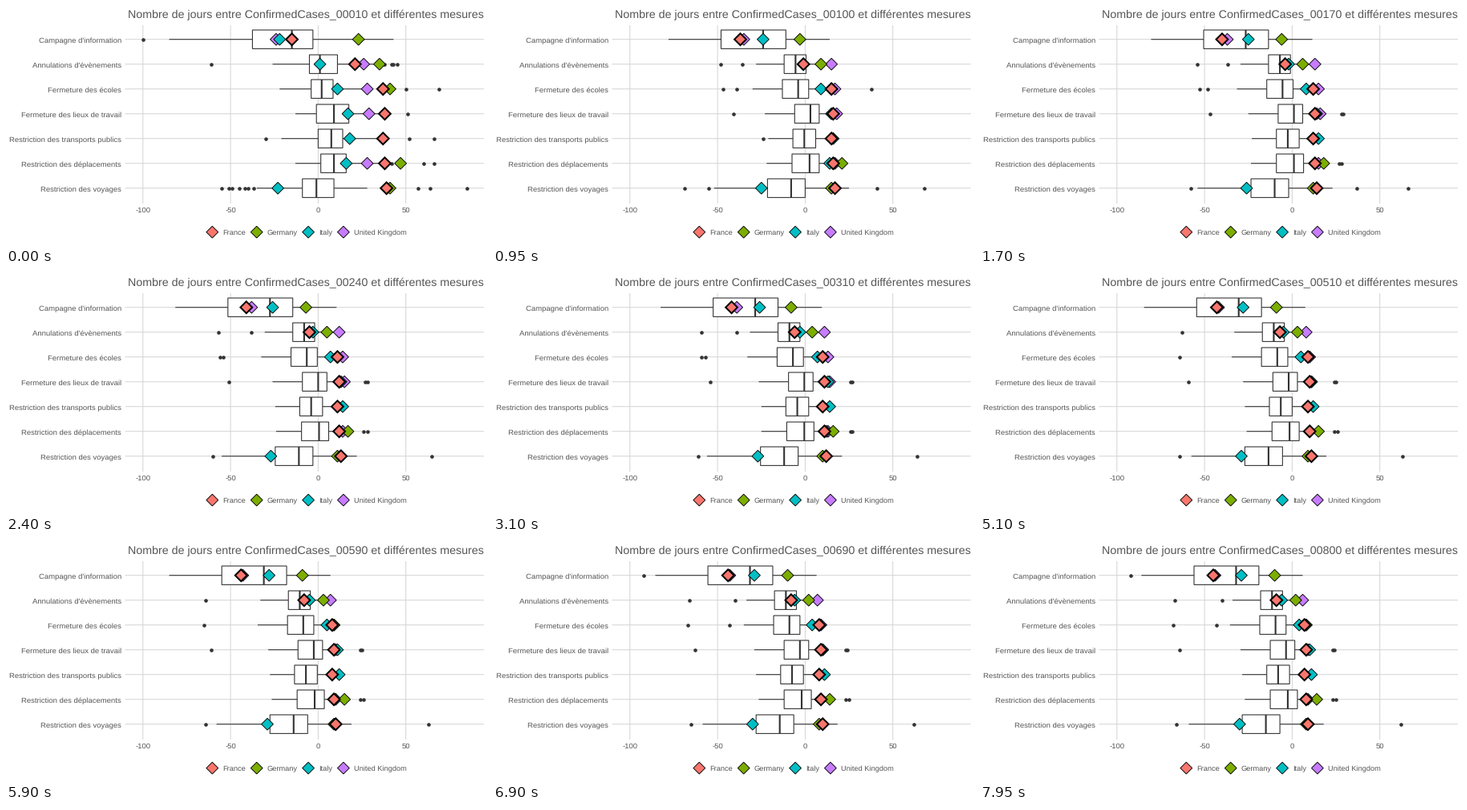
Recreate the animation shown at these times as a matplotlib script. Size 600x300 px, loop 8000 ms.

```python
import numpy as np
import matplotlib.pyplot as plt
from matplotlib.animation import FuncAnimation
from matplotlib.collections import LineCollection, PolyCollection

plt.rcParams["font.family"] = "Liberation Sans"
plt.rcParams["text.hinting"] = "none"

W, H, DPI = 600, 300, 100
PT = 72 / DPI                      # points per pixel
FRAMES, STEP_MS = 160, 50
ZERO_X, DAY_W = 389.4, 2.186       # x of day zero, pixels per day
ROW_Y, ROW_H, HALF_BOX = 41.7, 31, 11.7
INK, GRID = "#333333", "#d4d4d4"


def to_x(day):
    return ZERO_X + DAY_W * day


def log_mix(cases, c0, c1):
    """Position of cases between two thresholds on a log scale."""
    return np.log(cases / c0) / np.log(c1 / c0)


class Row:
    """Box as low, q1, median, q3, high at 10 and at 100 cases; beyond
    that it slides as a whole, by drift days until 800 cases.
    Tracks are outliers moving from (cases, day) to (cases, day)."""

    def __init__(self, label, start, later, drift, early=(), tracks=()):
        self.label, self.drift = label, drift
        self.start, self.later = np.array(start), np.array(later)
        self.early, self.tracks = early, tracks

    def box(self, cases):
        if cases < 100:
            mix = log_mix(cases, 10, 100)
            vals = self.start + (self.later - self.start) * mix
        else:
            vals = self.later + self.drift * log_mix(cases, 100, 800)
        return np.round(2 * vals) / 2

    def outliers(self, cases):
        days = list(self.early) if cases < 30 else []
        for c0, d0, c1, d1 in self.tracks:
            if c0 <= cases <= c1:
                days.append(round(d0 + (d1 - d0) * log_mix(cases, c0, c1)))
        return days


ROWS = [
    Row("Campagne d'information",
        [-85, -37.5, -15, -3, 43], [-78, -48, -24, -11, 14], -8,
        early=[-100], tracks=[(690, -92, 800, -92)]),
    Row("Annulations d'évènements",
        [-26, -5, 1, 11, 35], [-28, -12, -5.5, 0.5, 15], -6,
        early=[38, 42, 43, 45],
        tracks=[(10, -61, 40, -50), (50, -42, 800, -67),
                (100, -36, 500, -40), (700, -40, 800, -40)]),
    Row("Fermeture des écoles",
        [-22, -4, 2, 8.5, 27], [-30, -13, -4, 2, 17], -5.5,
        early=[50, 69],
        tracks=[(60, -42, 800, -68), (80, -36, 380, -60),
                (80, 40, 120, 37), (680, -43, 800, -43)]),
    Row("Fermeture des lieux de travail",
        [-13, -1, 9, 17.5, 38], [-23, -6, 3, 8, 19], -6.5,
        early=[51],
        tracks=[(60, -35, 800, -64), (140, 29, 800, 23),
                (140, 30, 800, 24)]),
    Row("Restriction des transports publics",
        [-21, 0, 7.5, 14, 35], [-21, -7, -0.5, 6, 17], -7.5,
        early=[-30, 52, 66], tracks=[(70, -24, 130, -24)]),
    Row("Restriction des déplacements",
        [-13, 1.5, 9, 16, 37], [-22, -7.5, 2.5, 8, 19], -5,
        early=[42, 60, 66],
        tracks=[(140, 28, 800, 23), (140, 29, 800, 25)]),
    Row("Restriction des voyages",
        [-35, -9, -1, 9, 28], [-52, -21.5, -8, 0, 25], -7,
        early=[-55, -51, -49, -45, -42, -40, -37, 57, 64, 85],
        tracks=[(50, -66, 120, -70), (100, -55, 800, -66),
                (60, 45, 220, 35), (40, 70, 800, 62)]),
]


class Country:
    """Day of each measure, and the days it took to reach each case count."""

    steps = np.log([10, 20, 100, 300, 800])

    def __init__(self, name, color, legend_x, days, reached):
        self.name, self.color, self.legend_x = name, color, legend_x
        self.days, self.reached = days, reached

    def shift(self, cases):
        return round(np.interp(np.log(cases), self.steps, self.reached))


COUNTRIES = [
    Country("France", "#F8766D", 256.8,
            [-15, 21, 37, 38, 37, 38, 39], [0, 20, 22, 27, 29.6]),
    Country("Germany", "#7CAE00", 312.2,
            [23, 35, 41, None, None, 47, 41], [0, 23, 26, 31, 33]),
    Country("Italy", "#00BFC4", 376.6,
            [-22, 1, 11, 17, 18, 16, -23], [0, 1, 2, 4.2, 7]),
    Country("United Kingdom", "#C77CFF", 420.4,
            [-24, 26, 28, 29, None, 28, None], [0, 5, 11, 15, 20]),
]


def diamond(x, y, r=7.4):
    return [(x - r, y), (x, y - r), (x + r, y), (x, y + r)]


fig = plt.figure(figsize=(W / DPI, H / DPI), dpi=DPI, facecolor="white")
ax = fig.add_axes([0, 0, 1, 1])
ax.set_xlim(0, W)
ax.set_ylim(H, 0)
ax.axis("off")


def text(x, y, s, size=9.5, color="#555555", ha="left"):
    return ax.text(x, y, s, fontsize=size * PT, color=color, ha=ha,
                   va="baseline")


def grid_line(xs, ys):
    ax.plot(xs, ys, color=GRID, lw=PT, zorder=1, solid_capstyle="butt",
            snap=False)


def add(kind, z, width, edge=INK, face="none"):
    coll = kind([], linewidths=width * PT, edgecolors=edge, facecolors=face,
                zorder=z, joinstyle="miter", capstyle="butt", snap=False)
    ax.add_collection(coll, autolim=False)
    return coll


row_ys = [ROW_Y + ROW_H * i for i in range(len(ROWS))]

# Fixed parts: grid, axis labels, legend
for y, row in zip(row_ys, ROWS):
    grid_line([148.5, 596], [y, y])
    text(144, y + 4, row.label, ha="right")
for day in (-100, -50, 0, 50):
    x = to_x(day)
    grid_line([x, x], [24, 247])
    text(x, 258, str(day), ha="center")
for c in COUNTRIES:
    key = add(PolyCollection, 5, 0.9, "black", c.color)
    key.set_verts([diamond(c.legend_x, 282.1)])
    text(c.legend_x + 13.3, 286, c.name, 9.3)

# Moving parts
title = text(596, 15, "", 14.25, ha="right")
dots, = ax.plot([], [], "o", ms=4.6 * PT, mew=0, color=INK, zorder=2,
                snap=False)
whiskers = add(LineCollection, 3, 1.1)
boxes = add(PolyCollection, 4, 1.1, face="white")
medians = add(LineCollection, 4.5, 2.1)
marks = [add(PolyCollection, 9 - i, 0.9 if i else 2, "black", c.color)
         for i, c in enumerate(COUNTRIES)]


def draw(k):
    cases = 10 * (k // 2 + 1)
    shown = 10 * max(1, (k + 1) // 2)   # the title follows one frame late
    title.set_text(f"Nombre de jours entre ConfirmedCases_{shown:05d}"
                   " et différentes mesures")
    lines, rects, mids, px, py = [], [], [], [], []
    for y, row in zip(row_ys, ROWS):
        low, q1, med, q3, high = to_x(row.box(cases))
        top, bottom = y - HALF_BOX, y + HALF_BOX
        lines += [[(low, y), (q1, y)], [(q3, y), (high, y)]]
        rects.append([(q1, top), (q3, top), (q3, bottom), (q1, bottom)])
        mids.append([(med, top), (med, bottom)])
        for d in row.outliers(cases):
            px.append(to_x(d))
            py.append(y)
    whiskers.set_segments(lines)
    boxes.set_verts(rects)
    medians.set_segments(mids)
    dots.set_data(px, py)
    for c, mark in zip(COUNTRIES, marks):
        s = c.shift(cases)
        mark.set_verts([diamond(to_x(d - s), y)
                        for d, y in zip(c.days, row_ys) if d is not None])
    return [title, dots, whiskers, boxes, medians, *marks]


anim = FuncAnimation(fig, draw, frames=FRAMES, interval=STEP_MS,
                     init_func=lambda: draw(0), repeat=True, repeat_delay=0,
                     blit=False)
plt.show()
```
